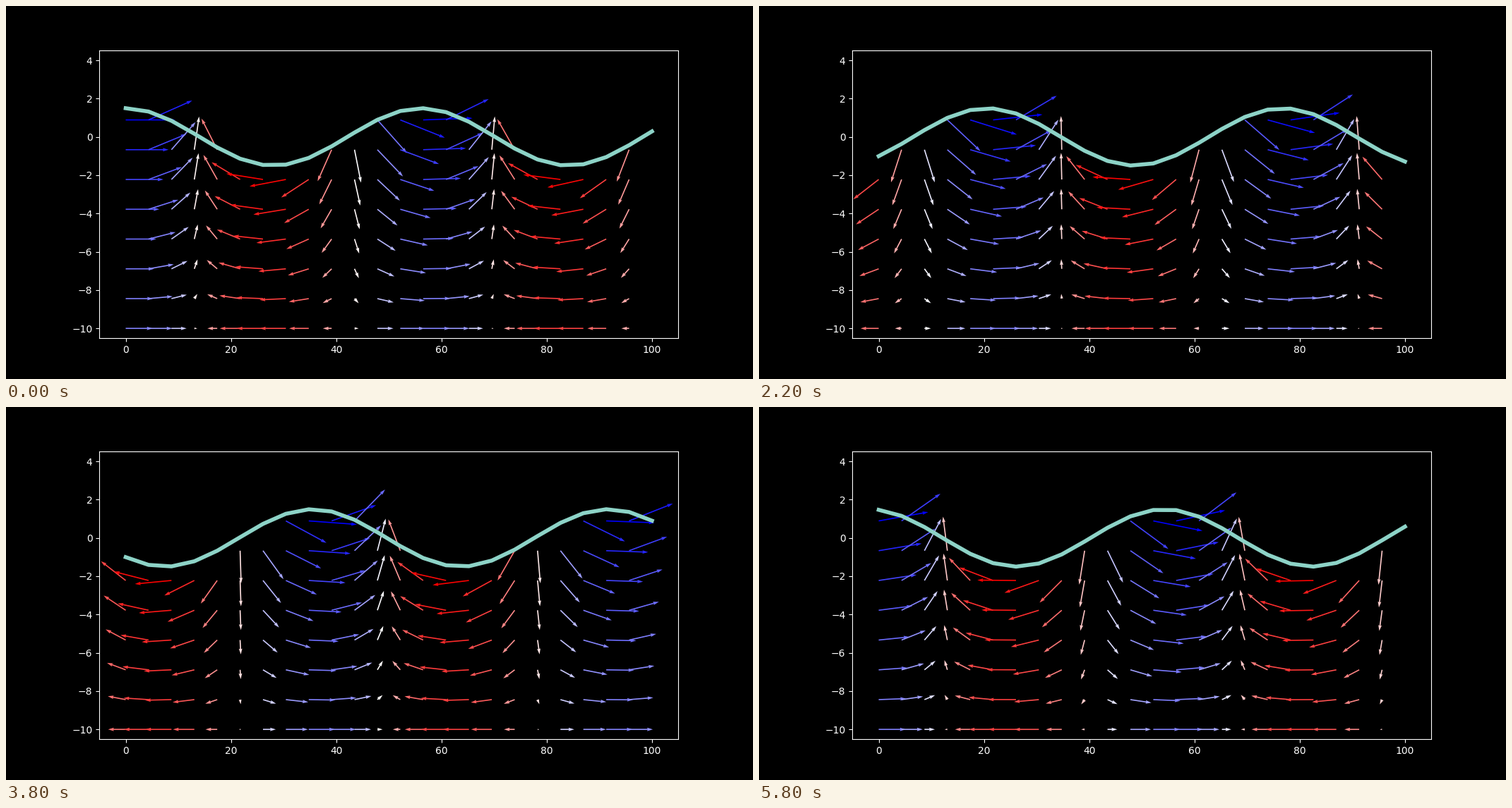
These frames come from a looping animation (1058 px wide and 529 px high, 6000 ms). A matplotlib script:

```python
import numpy as np
import matplotlib.pyplot as plt
from matplotlib.animation import FuncAnimation

plt.style.use("dark_background")

DPI = 100
FRAMES, INTERVAL = 30, 200
AMP, DEPTH, PERIOD, G = 1.5, 10, 6.0, 9.8

omega = 2 * np.pi / PERIOD
k = omega**2 / G  # deep-water dispersion

x = np.linspace(0, 100, 24)
z = np.linspace(-DEPTH, 4, 10)
X, Z = np.meshgrid(x[:-1], z, indexing="ij")


def surface(px, t):
    return AMP * np.cos(k * px - omega * t)


def velocity(px, pz, t):
    phase = k * px - omega * t
    height = k * (pz + DEPTH)
    return np.cosh(height) * np.cos(phase), np.sinh(height) * np.sin(phase)


fig, ax = plt.subplots(figsize=(1058 / DPI, 529 / DPI), dpi=DPI)
ax.set_xlim(-5, 105)
ax.set_ylim(-10.5, 4.5)
line, = ax.plot(x, surface(x, 0), lw=4)
arrows = None


def draw(frame):
    """Show the surface and the flow in the wet part of the grid."""
    global arrows
    t = frame * INTERVAL / 1000
    line.set_ydata(surface(x, t))
    if arrows is not None:
        arrows.remove()
    wet = Z <= surface(X, t)
    px, pz = X[wet], Z[wet]
    u, w = velocity(px, pz, t)
    # a fresh quiver rescales its lengths and colours every step
    arrows = ax.quiver(px, pz, u, w, u, cmap="bwr_r", width=0.002)
    return line, arrows


def reset():
    return draw(0)


anim = FuncAnimation(fig, draw, frames=FRAMES, init_func=reset,
                     interval=INTERVAL, repeat=True, repeat_delay=0)
plt.show()
```
